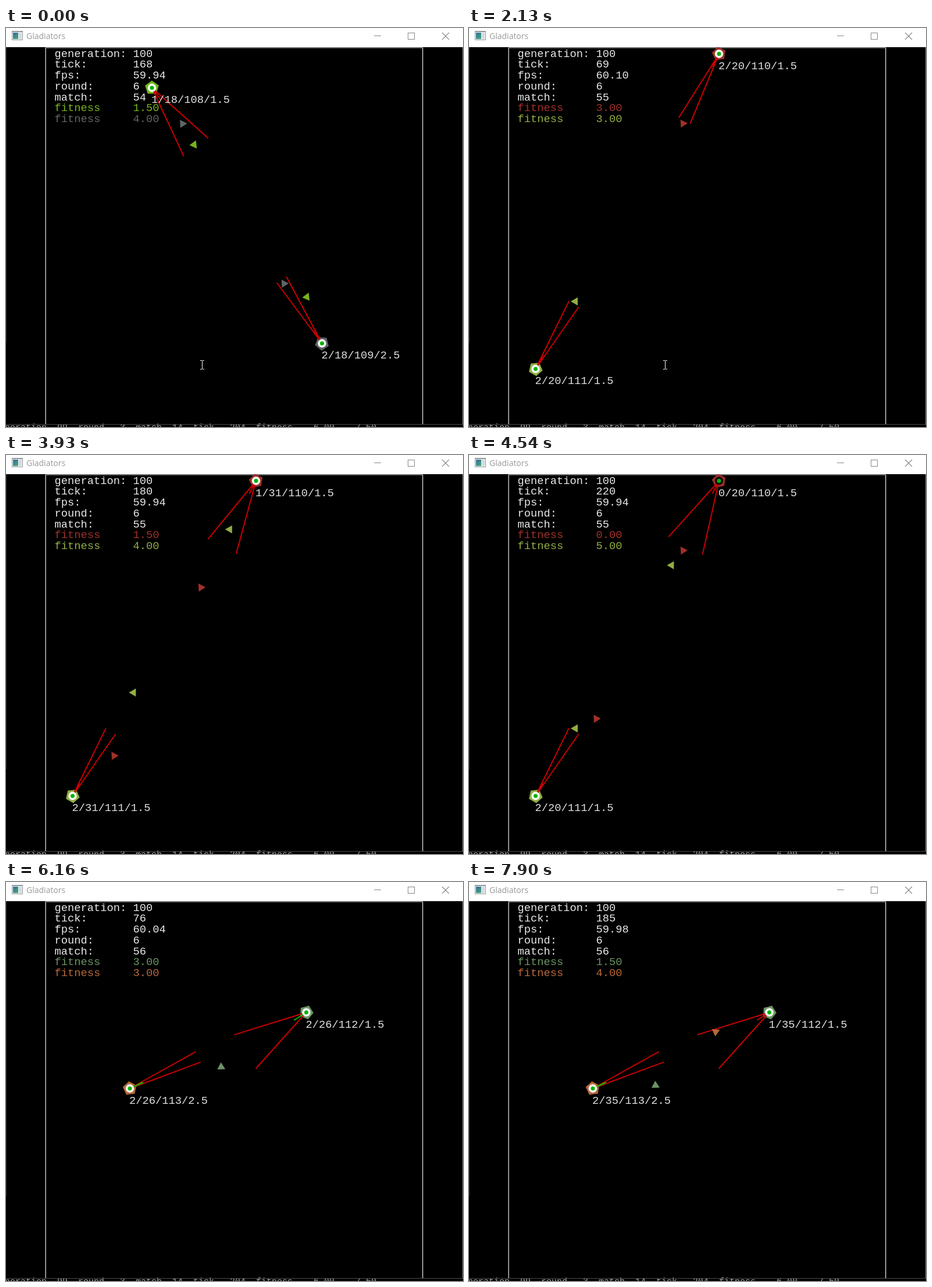
These frames come from a looping animation (786x687 px, 8000 ms). An HTML page with a canvas:

```html
<!DOCTYPE html>
<html lang="en">
<head>
<meta charset="utf-8">
<title>Gladiators</title>
<style>
html, body { margin: 0; width: 786px; height: 687px; overflow: hidden; background: #000; }
canvas { display: block; }
</style>
</head>
<body>
<canvas id="stage" width="786" height="687"></canvas>
<script>
const ctx = document.getElementById('stage').getContext('2d');
const LOOP = 8000, RAD = Math.PI / 180;
const MONO = '"Liberation Mono", monospace';
const RELOAD = 50, SPEED = 6.52, MUZZLE = 4.5, SIGHT = 130;
const RED = '#cc0000', GREEN = '#00c400';
const FPS = ['59.94', '60.10', '59.94', '60.04', '59.98'];

// Screen refreshes: [ms, refresh count], evenly spaced between the keys.
const beats = [[0, 0], [1100, 9], [2130, 17], [3270, 26], [4540, 36], [6160, 48], [7900, 61]];

// Bot properties are constants or [tick, value] keys.
// life: ticks until a shot strikes the opponent; miss: early shots that go wide;
// calm: tick until which the heading mark stays green.
const matches = [
  {
    no: 54, start: 0, ticks: [[0, 168.2], [1000, 230.4]],
    bots: [
      { id: 108, size: '1.5', col: '#77b41c', x: 251, y: 103, ang: 53.5, half: 11.6 },
      { id: 109, size: '2.5', col: '#5f6466', x: 543.5, y: 543, ang: 237.6, half: 4.3, life: 77 }
    ]
  },
  {
    no: 55, start: 988, ticks: [[1100, 7.2], [2130, 69.9], [4540, 220.3], [4950, 245]],
    bots: [
      { id: 110, size: '1.5', col: '#a03028', x: 430, y: [[7, 41.5], [31, 44.5]], ang: 117.3,
        half: [[69, 4.8], [220, 14.7]], calm: 50 },
      { id: 111, size: '1.5', col: '#92ae44', x: 114.5, y: 587,
        ang: [[7, 159.5], [22, 112], [40, 300.5]], half: 4.3, life: 96 }
    ]
  },
  {
    no: 56, start: 4960, ticks: [[4944, 0.3], [6160, 76.2], [7900, 185.2]],
    bots: [
      { id: 112, size: '1.5', col: '#6b9464', x: 516.5, y: 224.5,
        ang: [[6, -70], [24, -25], [42, 147.3]], half: 15.4, calm: 147 },
      { id: 113, size: '2.5', col: '#b8683a', x: 213, y: 355.5,
        ang: [[6, 222], [46, 205], [50, 188], [67, -24.8]],
        half: 4.4, life: 47, miss: 1, calm: 999 }
    ]
  }
];

// Piecewise linear value; from/to choose the key columns.
function at(keys, t, from = 0, to = 1) {
  if (!Array.isArray(keys)) return keys;
  const i = keys.findIndex(k => k[from] > t);
  if (i === 0) return keys[0][to];
  if (i < 0) return keys[keys.length - 1][to];
  const a = keys[i - 1], b = keys[i];
  return a[to] + (b[to] - a[to]) * (t - a[from]) / (b[from] - a[from]);
}

function rect(x, y, w, h, col) {
  ctx.fillStyle = col;
  ctx.fillRect(x, y, w, h);
}

function disc(x, y, r, col) {
  ctx.fillStyle = col;
  ctx.beginPath();
  ctx.arc(x, y, r, 0, 7);
  ctx.fill();
}

function polygon(x, y, r, sides, deg, col) {
  ctx.fillStyle = col;
  ctx.beginPath();
  for (let i = 0; i < sides; i++) {
    const a = (deg + i * 360 / sides) * RAD;
    ctx.lineTo(x + r * Math.cos(a), y + r * Math.sin(a));
  }
  ctx.fill();
}

function line(x0, y0, x1, y1, col, w) {
  ctx.strokeStyle = col;
  ctx.lineWidth = w;
  ctx.beginPath();
  ctx.moveTo(x0, y0);
  ctx.lineTo(x1, y1);
  ctx.stroke();
}

function ray(x, y, deg, len, col) {
  line(x, y, x + len * Math.cos(deg * RAD), y + len * Math.sin(deg * RAD), col, 2);
}

function text(str, x, y, col, font = '18.75px ' + MONO) {
  ctx.font = font;
  ctx.fillStyle = col;
  ctx.fillText(str, x, y);
}

// Number of strikes a bot has landed, at most two.
function hitsBy(bot, tick) {
  if (!bot.life) return 0;
  const landed = Math.floor((tick - bot.life) / RELOAD) - (bot.miss || 0);
  return Math.min(2, Math.max(0, landed));
}

function drawShots(bot, tick) {
  for (let fired = RELOAD; fired <= tick; fired += RELOAD) {
    const n = Math.round(tick) - fired;
    if (n > (bot.life || Infinity)) continue;
    const deg = at(bot.ang, fired - 5), d = SPEED * n + MUZZLE;
    const x = at(bot.x, fired) + d * Math.cos(deg * RAD);
    const y = at(bot.y, fired) + d * Math.sin(deg * RAD);
    if (x > 68 && x < 717 && y > 34 && y < 683) polygon(x, y, 8, 3, deg, bot.col);
  }
}

function drawBot(bot, foe, tick) {
  const x = at(bot.x, tick), y = at(bot.y, tick);
  const deg = at(bot.ang, tick), half = at(bot.half, tick);
  const toFoe = Math.atan2(at(foe.y, tick) - y, at(foe.x, tick) - x) / RAD;
  const off = ((deg - toFoe + 540) % 360 + 360) % 360 - 180;
  const seen = Math.abs(off) < half;
  const beam = seen ? RED : GREEN;
  const health = 2 - hitsBy(foe, tick);

  polygon(x, y, 12.4, 5, deg, bot.col);
  ray(x, y, deg - half, SIGHT, beam);
  ray(x, y, deg + half, SIGHT, beam);
  ray(x, y, deg, 25, tick < (bot.calm || 0) ? GREEN : beam);
  disc(x, y, 7.2, health > 0 ? '#fff' : '#180808');
  disc(x, y, 3.5, '#00b400');
  text([health, Math.round(tick) % RELOAD, bot.id, bot.size].join('/'), x - 1, y + 26, '#e0e0e0');
}

function drawHud(match, tick, t) {
  const [a, b] = match.bots;
  const score = (me, foe) => (3 + hitsBy(me, tick) - 1.5 * hitsBy(foe, tick)).toFixed(2);
  const rows = [
    ['generation:', 100], ['tick:', Math.floor(tick)], ['fps:', FPS[Math.floor(t / 1700)]],
    ['round:', 6], ['match:', match.no],
    ['fitness', score(a, b), a.col], ['fitness', score(b, a), b.col]
  ];
  rows.forEach(([label, value, col = '#e8e8e8'], i) => {
    const y = 49.5 + 18.75 * i;
    text(label, 83.5, y, col);
    text(value, 218.5, y, col);
  });
}

function drawTitleBar() {
  rect(0, 0, 786, 33, '#fff');
  rect(10, 5, 19, 16, '#8f979c');
  rect(11, 7, 17, 13, '#f4f6f7');
  const g = ctx.createLinearGradient(12, 8, 20, 19);
  g.addColorStop(0, '#2f6f93');
  g.addColorStop(1, '#4aa583');
  rect(12, 8, 9, 11, g);
  rect(22, 8, 5, 11, '#d4d9dc');
  text('Gladiators', 35, 19, '#999', '14px "Open Sans", "Noto Sans", sans-serif');
  rect(633, 13, 12, 1, '#888');
  ctx.strokeStyle = '#888';
  ctx.lineWidth = 1;
  ctx.strokeRect(691.5, 8.5, 11, 11);
  line(750, 8, 762, 20, '#888', 1.1);
  line(762, 8, 750, 20, '#888', 1.1);
}

function drawArena() {
  rect(68, 33.5, 649, 1, '#dcdcdc');
  for (const x of [67.5, 716]) rect(x, 34, 1.3, 648, '#dcdcdc');
}

function drawEdges() {
  rect(0, 682, 786, 5, '#000');
  text('neration  99  round   3  match  14  tick   204  fitness    6.00   -7.50',
    -2, 692, '#a8a8a8', '15px ' + MONO);
  rect(0, 682, 786, 1, '#4a4a4a');
  rect(0, 33, 1, 508, '#2a2a2a');
  rect(785, 33, 1, 650, '#777');
}

function drawCursor() {
  rect(337, 573, 1, 14, '#fff');
  for (const y of [572, 587]) {
    rect(334, y, 3, 1, '#fff');
    rect(338, y, 3, 1, '#fff');
  }
}

function draw(now) {
  const refresh = Math.floor(at(beats, now % LOOP) + 0.03);
  const t = at(beats, refresh, 1, 0);
  const match = matches.filter(m => m.start <= t).pop();
  const tick = at(match.ticks, t);
  const [a, b] = match.bots;

  rect(0, 0, 786, 687, '#000');
  drawArena();
  drawHud(match, tick, t);
  drawBot(a, b, tick);
  drawBot(b, a, tick);
  drawShots(a, tick);
  drawShots(b, tick);
  drawEdges();
  drawTitleBar();
  if (t < 2700) drawCursor();
}

const begin = performance.now();
function loop() {
  draw(performance.now() - begin);
  requestAnimationFrame(loop);
}
loop();
</script>
</body>
</html>
```
